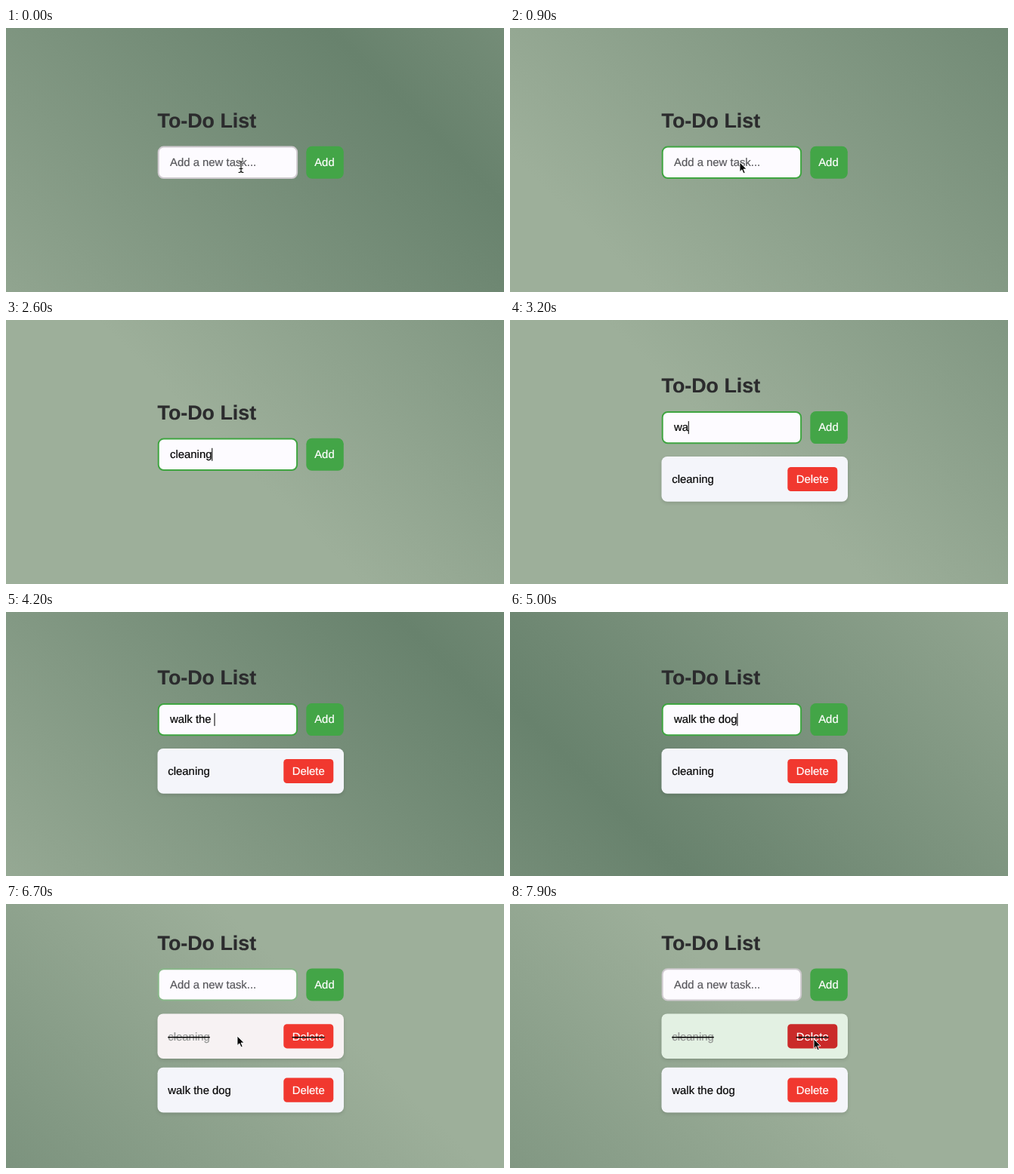
An HTML page for the animation above (8000 ms loop, 659 px wide and 350 px high).

```html
<!DOCTYPE html>
<html lang="en">
<head>
<meta charset="utf-8">
<title>To-Do List</title>
<style>
  html, body { margin: 0; width: 100%; height: 100%; overflow: hidden; }
  svg {
    display: block; width: 659px; height: 350px;
    background: linear-gradient(45deg, #9daf9a 25%, #68826d 50%, #9daf9a 75%) 0 50% / 400% 400%;
  }
  text {
    font: 14.9px "Liberation Sans", Arial, Helvetica, sans-serif;
    white-space: pre; text-rendering: geometricPrecision;
    fill: currentColor; stroke: currentColor; stroke-width: .2px;
  }
  .title { font-size: 26.8px; font-weight: bold; color: #2b2b2d; }
  .light { color: #fff; }
  .card { filter: drop-shadow(0 2px 2px rgba(0, 0, 0, .12)); }
</style>
</head>
<body>
<svg id="stage" viewBox="0 0 659 350">
  <defs>
    <path id="beamShape" d="M-3 -7.5Q0 -7.5 0 -5.5Q0 -7.5 3 -7.5M0 -5.5V5.5M-3 7.5Q0 7.5 0 5.5Q0 7.5 3 7.5M-2 2.5H2"/>
  </defs>
  <g id="app">
    <text class="title" x="200.6" y="132">To-Do List</text>
    <rect id="field" x="201.7" y="157.6" width="183.4" height="41.4" rx="7" fill="#fdfbff" stroke-width="2"/>
    <text id="entry" x="217" y="183"></text>
    <rect id="caret" y="169.8" width="1.1" height="17" fill="#111"/>
    <rect x="397.3" y="156.8" width="49.5" height="43" rx="7.5" fill="#43a547"/>
    <text class="light" x="408.2" y="183">Add</text>
    <g id="list"></g>
  </g>
  <g id="beam" fill="none" stroke-linecap="round">
    <use href="#beamShape" stroke="#fff" stroke-width="2.6"/>
    <use href="#beamShape" stroke="#111" stroke-width="1.2"/>
  </g>
  <path id="arrow" d="M0 0V12.6L2.9 9.9L5 14.8L7.2 13.9L5.1 9.1H9.1Z" fill="#080808" stroke="#fff" stroke-width=".9" stroke-linejoin="round"/>
</svg>
<script>
const LOOP = 8000, FOCUS = 400, DONE = 6550;
const DRIFT = 10000, DRIFT_START = 6850;
const ROW = 71.4;
const GREY = "#cfcacf", GREEN = "#3fa541";
const PLAIN = "#f4f5fa", HOVER = "#e3f1e3", CHECKED = "#f7f2f3";
const RED = "#f1382f", DARK_RED = "#ca2a29";

const tasks = [
  { text: "cleaning", start: 1200, step: 170, added: 2700 },
  { text: "walk the dog", start: 2900, step: 155, added: 5150 }
];

// Each move shifts the pointer by dx, dy.
const moves = [
  { start: 150, length: 450, dx: -7, dy: -6 },
  { start: 5300, length: 300, dx: -7, dy: 13 },
  { start: 5600, length: 700, dx: 9, dy: -16 },
  { start: 7200, length: 600, dx: 96, dy: 4 }
];

const $ = id => document.getElementById(id);
const show = (el, on) => { el.style.display = on ? "" : "none"; };
const mix = (a, b, u) => `color-mix(in srgb, ${b} ${u * 100}%, ${a})`;

function fade(t, start, length = 300) {
  const u = Math.max(0, Math.min(1, (t - start) / length));
  return u * u * (3 - 2 * u);
}

function svg(tag, attrs, parent, text = "") {
  const el = document.createElementNS("http://www.w3.org/2000/svg", tag);
  for (const k in attrs) el.setAttribute(k, attrs[k]);
  el.textContent = text;
  return parent.appendChild(el);
}

const items = tasks.map((task, i) => {
  const g = svg("g", { transform: `translate(200.5 ${216.8 + ROW * i})` }, $("list"));
  const card = svg("rect", { class: "card", width: 246.5, height: 59.6, rx: 7.5 }, g);
  const label = svg("text", { x: 13.8, y: 35.3 }, g, task.text);
  const button = svg("rect", { x: 166.8, y: 13.8, width: 66, height: 32.2, rx: 4.5 }, g);
  svg("text", { class: "light", x: 178.2, y: 35.3 }, g, "Delete");
  return { g, card, label, button };
});

const drift = $("stage").animate([
  { backgroundPosition: "0% 50%", easing: "ease" },
  { backgroundPosition: "100% 50%", easing: "ease" },
  { backgroundPosition: "0% 50%" }
], { duration: DRIFT, iterations: Infinity });
drift.pause();

function drawField(t) {
  const glow = fade(t, FOCUS) - fade(t, DONE);
  $("field").style.stroke = mix(GREY, GREEN, glow);

  const task = tasks.find(k => t < k.added);
  const count = task ? Math.max(0, Math.min(task.text.length, Math.floor((t - task.start) / task.step) + 1)) : 0;
  const entry = $("entry");
  entry.textContent = count ? task.text.slice(0, count) : "Add a new task...";
  entry.style.color = count ? "#050505" : "#58585c";

  // The blink restarts at every edit.
  const added = tasks.map(k => k.added).filter(a => a <= t);
  const edit = count ? task.start + (count - 1) * task.step : Math.max(FOCUS, ...added);
  show($("caret"), t >= FOCUS && t < DONE && (t - edit) % 1000 < 500);
  $("caret").setAttribute("x", 216.7 + (count ? entry.getComputedTextLength() : 0));
}

function drawItems(t) {
  items.forEach((item, i) => {
    const first = i === 0, done = first && t >= DONE;
    const over = first ? fade(t, done ? 7250 : 5230) : 0;
    const press = first ? fade(t, 7580) : 0;
    show(item.g, t >= tasks[i].added);
    item.card.style.fill = mix(done ? CHECKED : PLAIN, HOVER, over);
    item.button.style.fill = mix(RED, DARK_RED, press);
    item.label.style.color = done ? "#949694" : "#050505";
    item.g.style.textDecoration = done ? "line-through" : "none";
  });
}

function drawPointer(t) {
  let x = 311, y = 184;
  for (const m of moves) {
    const u = fade(t, m.start, m.length);
    x += m.dx * u;
    y += m.dy * u;
  }
  for (const id of ["beam", "arrow"]) $(id).setAttribute("transform", `translate(${x} ${y})`);
  show($("beam"), t < 600);
  show($("arrow"), (t >= 600 && t < tasks[0].start) || t >= 5300);
}

function draw(t) {
  drift.currentTime = (t + DRIFT_START) % DRIFT;
  const count = tasks.filter(k => t >= k.added).length;
  $("app").setAttribute("transform", `translate(0 ${-ROW / 2 * count})`);
  drawField(t);
  drawItems(t);
  drawPointer(t);
}

function tick() {
  draw(performance.now() % LOOP);
  requestAnimationFrame(tick);
}
tick();
</script>
</body>
</html>
```
